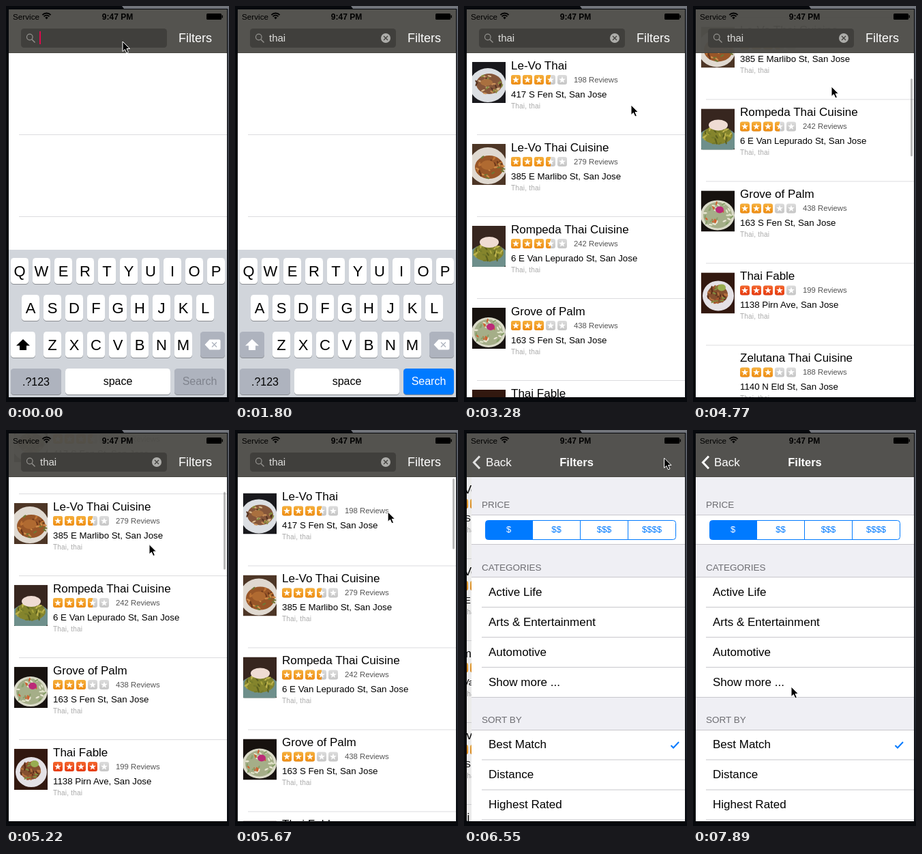
These frames come from a looping animation (327 px wide and 580 px high, 8000 ms). An HTML page:

```html
<!DOCTYPE html>
<html lang="en">
<head>
<meta charset="utf-8">
<title>Restaurant search</title>
<style>
html, body { margin: 0; width: 100%; height: 100%; overflow: hidden; background: #07090d; }
svg { display: block; width: 327px; height: 580px; font-family: "Liberation Sans", Arial, sans-serif; }
svg svg { width: 49px; height: 60px; }
</style>
</head>
<body>
<svg id="stage" viewBox="0 0 327 580"></svg>
<script>
const LOOP = 8000, STEP = 148.86;
const BLUE = '#007aff', LINE = '#c8c7cc';

const rect = (x, y, w, h, fill, r = 0, extra = '') =>
  `<rect x="${x}" y="${y}" width="${w}" height="${h}" rx="${r}" fill="${fill}" ${extra}/>`;
const text = (x, y, size, fill, str, extra = '') =>
  `<text x="${x}" y="${y}" font-size="${size}" fill="${fill}" ${extra}>${str}</text>`;
const path = (d, fill, extra = '') => `<path d="${d}" fill="${fill}" ${extra}/>`;
const ellipse = (cx, cy, rx, ry, fill, extra = '') =>
  `<ellipse cx="${cx}" cy="${cy}" rx="${rx}" ry="${ry}" fill="${fill}" ${extra}/>`;
const hline = (x, y, color = LINE) => rect(x, y, 324 - x, 1, color);
const MID = 'text-anchor="middle"';

function randomFrom(seed) {
  return () => (seed = seed * 16807 % 2147483647) / 2147483647;
}

// ---- search results ----
const places = [
  ['Le-Vo Thai', 3.5, 198, '417 S Fen St'],
  ['Le-Vo Thai Cuisine', 3.5, 279, '385 E Marlibo St'],
  ['Rompeda Thai Cuisine', 3.5, 242, '6 E Van Lepurado St'],
  ['Grove of Palm', 3, 438, '163 S Fen St'],
  ['Thai Fable', 4, 199, '1138 Pirn Ave'],
  ['Zelutana Thai Cuisine', 3, 188, '1140 N Eld St'],
];

// Each layer is an ellipse: cx, cy, rx, ry, colour.
const dishes = [
  { back: '#19191d', plate: [23, 34, 27, 25, '#dcdfe3'], food: [25, 32, 19, 15, '#85563a'],
    top: [21, 30, 9, 5, '#a9703f'], bits: ['#c98f58', '#553422', '#868c40', '#d9b88c'] },
  { back: '#4d3626', plate: [23, 32, 28, 27, '#e0d9d0'], food: [25, 34, 21, 17, '#985628'],
    top: [23, 31, 10, 7, '#b06a31'], bits: ['#d08c48', '#6a3519', '#bd7335', '#707735'] },
  { back: '#37261f', plate: [24, 47, 30, 20, '#6e8f8b'], food: [24, 39, 22, 13, '#84842c'],
    top: [25, 24, 14, 8, '#efdcd3'], bits: ['#a9a53c', '#5d611f', '#c0b450', '#757a2a'] },
  { back: '#17120f', plate: [24, 36, 25, 22, '#dadac8'], food: [24, 36, 21, 19, '#a5ae88'],
    top: [27, 28, 6, 5, '#bb2a78'], bits: ['#e0e3c8', '#cf6130', '#88a06a', '#eae7d4'] },
  { back: '#32180f', plate: [25, 34, 23, 22, '#e4e1e5'], food: [24, 32, 15, 13, '#85502f'],
    top: [30, 22, 6, 5, '#98ad50'], bits: ['#b5713f', '#5c2f1a', '#a4562f', '#7f8d40'] },
];

function photo({ back, plate, food, top, bits }, y, i) {
  const rnd = randomFrom(77 + i), [cx, cy, rx, ry] = food;
  let crumbs = '';
  for (let k = 0; k < 36; k++) {
    const a = rnd() * 2 * Math.PI, r = Math.sqrt(rnd());
    const x = (cx + rx * r * Math.cos(a)).toFixed(1), v = (cy + ry * r * Math.sin(a)).toFixed(1);
    crumbs += ellipse(x, v, 3, 1.2, bits[k % bits.length], `transform="rotate(${k * 47} ${x} ${v})"`);
  }
  return `<svg x="12" y="${y}" width="49" height="60" viewBox="0 0 49 60">` + rect(0, 0, 49, 60, back) +
    `<g filter="url(#soft)">${ellipse(...plate)}${ellipse(...food)}${crumbs}${ellipse(...top)}</g></svg>`;
}

function starPath(cx, cy) {
  const pts = Array.from({ length: 10 }, (_, k) => {
    const r = k % 2 ? 2.1 : 5.2, a = k * Math.PI / 5 - Math.PI / 2;
    return `${(cx + r * Math.cos(a)).toFixed(2)} ${(cy + r * Math.sin(a)).toFixed(2)}`;
  });
  return `M${pts.join('L')}Z`;
}

function rating(score, y) {
  const color = score >= 4 ? 'url(#red)' : 'url(#orange)';
  let out = '';
  for (let i = 0; i < 5; i++) {
    const x = 69 + 17 * i, fill = Math.min(1, Math.max(0, score - i));
    out += rect(x, y, 14, 14, 'url(#grey)', 3);
    if (fill === 1) out += rect(x, y, 14, 14, color, 3);
    else if (fill) out += path(`M${x + 7} ${y}h-4q-3 0-3 3v8q0 3 3 3h4z`, color);
    out += path(starPath(x + 7, y + 7.3), '#fff');
  }
  return out;
}

function place([name, score, reviews, street], i) {
  const y = 69 + 120 * i;
  return (dishes[i] ? photo(dishes[i], y + 13, i) : '') +
    text(69, y + 24, 17, '#000', name) +
    rating(score, y + 32) +
    text(161, y + 42.5, 11.3, '#555', `${reviews} Reviews`) +
    text(69, y + 64.5, 13.3, '#000', `${street}, San Jose`) +
    text(69, y + 81, 10, '#aaa', 'Thai, thai', 'letter-spacing=".2"');
}

const separators = Array.from({ length: 8 }, (_, i) => hline(19, 188 + 120 * i, '#dcdcdf')).join('');

// ---- keyboard ----
const key = (x, y, w, fill = '#fff', id = '') =>
  rect(x, y + 1, w, 38, '#8a8d92', 4.5) + rect(x, y, w, 38, fill, 4.5, id && `id="${id}"`);
const letters = (row, x, y) => [...row].map((c, i) =>
  key(x + 32 * i, y, 26) + text(x + 32 * i + 13, y + 27, 22, '#000', c, MID)).join('');

const keyboard = rect(4, 357, 320, 216, '#d1d5db') +
  letters('QWERTYUIOP', 7, 369) + letters('ASDFGHJKL', 23, 423) + letters('ZXCVBNM', 55, 477) +
  key(7, 477, 36, '#fff', 'shift') +
  path('M25 488l10 9.5h-5v6.5h-10v-6.5h-5z', '#000', 'id="shiftArrow" stroke-linejoin="round"') +
  key(285, 477, 36, '#aeb3be') +
  path('M291.5 496l7-7.5h14q2 0 2 2v11q0 2-2 2h-14z', '#fff') +
  path('M302 492.5l7 7m0-7l-7 7', 'none', 'stroke="#aeb3be" stroke-width="1.3"') +
  key(7, 531, 74, '#aeb3be') + text(44, 556, 16, '#000', '.?123', MID) +
  key(87, 531, 154) + text(164, 555, 16, '#000', 'space', MID) +
  key(247, 531, 74, '#aeb3be', 'go') + text(284, 555, 16, '#7f838d', 'Search', MID + ' id="goLabel"');

// ---- filters page ----
const options = (names, y) => names.map((name, i) =>
  text(29, y + 27.5 + 44 * i, 17, '#000', name) + (i ? hline(19, y + 44 * i) : '')).join('');
const heading = (y, str) => text(19, y, 13.5, '#6d6d72', str);
const block = (y, h) => rect(4, y, 320, h, '#fff') + hline(4, y) + hline(4, y + h - 1);

const filters = rect(4, 5, 320, 568, '#efeff4') +
  heading(114, 'PRICE') + block(124, 44) +
  path('M93.5 132.5h-65q-4 0-4 4v20q0 4 4 4h65z', BLUE) +
  rect(24.5, 132.5, 279, 28, 'none', 4, `stroke="${BLUE}"`) +
  [93.5, 163.5, 233.5].map(x => path(`M${x} 132.5v28`, 'none', `stroke="${BLUE}"`)).join('') +
  [1, 2, 3, 4].map(n => text(70 * n - 11.5, 150, 13, n === 1 ? '#fff' : BLUE, '$'.repeat(n), MID)).join('') +
  heading(205.5, 'CATEGORIES') + block(215, 177) +
  options(['Active Life', 'Arts &amp; Entertainment', 'Automotive', 'Show more ...'], 215) +
  heading(429, 'SORT BY') + block(439, 140) +
  options(['Best Match', 'Distance', 'Highest Rated', ''], 438.5) +
  path('M296.5 462l3.5 3.5 8-8.5', 'none', `stroke="${BLUE}" stroke-width="2"`);

// ---- bars ----
const searchBar =
  rect(22, 33, 214, 28, '#403f3c', 4.5) +
  '<circle cx="34.8" cy="45.5" r="4.3" fill="none" stroke="#93928e" stroke-width="1.2"/>' +
  path('M38 49l4.5 4.5', 'none', 'stroke="#93928e" stroke-width="1.4"') +
  text(50, 51.5, 15, '#dededc', '', 'id="query"') +
  rect(49, 37, 2, 19, '#dc0a4c', 0, 'id="caret"') +
  '<g id="clear"><circle cx="221" cy="47" r="7" fill="#adadaa"/>' +
  path('M218 44l6 6m0-6l-6 6', 'none', 'stroke="#403f3c" stroke-width="1.3"') + '</g>' +
  text(253, 53, 18, '#fff', 'Filters');

const arc = r => `M${59.5 - r * .72} ${19.5 - r * .75}a${r} ${r} 0 0 1 ${r * 1.44} 0`;
const statusBar =
  text(10, 19.5, 11.7, '#000', 'Service') +
  path(arc(8.5) + arc(5.5), 'none', 'stroke="#000" stroke-width="1.8"') +
  path('M59.5 19.5l-2.2-2.5q2.2-1.8 4.4 0z', '#000') +
  text(163.5, 19.5, 12, '#000', '9:47 PM', MID + ' font-weight="bold"') +
  rect(294, 11, 22, 9, '#000', 1.5) + rect(316.5, 13.5, 1.5, 4, '#000');

const gradient = (id, a, b) =>
  `<linearGradient id="${id}" x2="0" y2="1"><stop stop-color="${a}"/><stop offset="1" stop-color="${b}"/></linearGradient>`;

document.getElementById('stage').innerHTML = `<defs>
  ${gradient('orange', '#f6b03c', '#ee8c12')}${gradient('red', '#f4672e', '#e63a10')}
  ${gradient('grey', '#dcdcdc', '#c6c6c6')}${gradient('edge', '#5c6069', '#0b0e14')}
  <filter id="soft"><feGaussianBlur stdDeviation=".5"/></filter>
  <clipPath id="screen"><rect x="4" y="5" width="320" height="568"/></clipPath></defs>` +
  rect(0, 0, 327, 580, '#07090d') + rect(325, 0, 2, 573, 'url(#edge)') + path('M170 0H327V4H173z', '#72757c') +
  `<g clip-path="url(#screen)">` + rect(4, 5, 320, 568, '#fff') +
  `<g id="results"><g id="list">${separators}<g id="places">${places.map(place).join('')}</g></g>` +
  rect(319, 71, 3, 114, '#000', 1.5, 'id="thumb"') + `</g>` +
  rect(4, 5, 320, 568, '#000', 0, 'id="shade"') +
  `<g id="keyboard">${keyboard}</g><g id="filters">${filters}</g>` +
  rect(4, 5, 320, 64, '#4f4e4a', 0, 'opacity=".97"') + rect(4, 68, 320, 1, '#45443f') + statusBar +
  `<g id="searchBar">${searchBar}</g><g id="filterBar">` +
  path('M23 38.5l-8.5 9 8.5 9', 'none', 'id="chevron" stroke="#fff" stroke-width="3"') +
  `<g id="titles">` + text(31, 53, 17, '#fff', 'Back') +
  text(164, 53, 16.5, '#fff', 'Filters', MID + ' font-weight="bold"') + `</g></g></g>` +
  path('M0 0v14.5l3.4-3 2.5 5.5 2.5-1.1-2.4-5.4h4.5z', '#000',
    'id="pointer" stroke="#fff" stroke-width="1" stroke-linejoin="round"');

const ui = {};
document.querySelectorAll('[id]').forEach(el => ui[el.id] = el);
const set = (el, attrs) => Object.entries(attrs).forEach(([k, v]) => el.setAttribute(k, v));
const show = (el, on) => el.setAttribute('visibility', on ? 'visible' : 'hidden');
const shift = (el, x, y) => el.setAttribute('transform', `translate(${x} ${y})`);

// Linear interpolation over [time, value...] keys.
function track(keys, t) {
  const i = keys.findIndex(k => k[0] > t);
  if (i === 0) return keys[0].slice(1);
  if (i < 0) return keys[keys.length - 1].slice(1);
  const a = keys[i - 1], b = keys[i], p = (t - a[0]) / (b[0] - a[0]);
  return a.slice(1).map((v, k) => v + (b[k + 1] - v) * p);
}

const pointerKeys = [
  [0, 171, 52], [1900, 283, 572], [2090, 277, 552], [2520, 275, 546], [2950, 258, 270], [3275, 245, 145],
  [3720, 256, 95], [4020, 272, 50], [4320, 262, 115], [4465, 222, 215], [4620, 208, 165], [4763, 203, 118],
  [4910, 203, 90], [5060, 205, 105], [5360, 215, 230], [5656, 224, 120], [5950, 265, 62], [6100, 282, 46],
  [6400, 290, 41], [6550, 293.5, 41], [6698, 286, 70], [6995, 205, 120], [7145, 168, 172], [7440, 156, 270],
  [7740, 146, 360], [7889, 144, 376],
];
const scrollKeys = [
  [4320, 0], [4465, 22], [4615, 110], [4763, 171.5], [4912, 205], [5061, 185], [5210, 95],
  [5359, 10], [5508, -26], [5656, -10.5], [5805, -2.5], [5954, 0],
];

const typed = t => t < 140 ? '' : t < 290 ? 't' : t < 740 ? 'th' : t < 890 ? 'tha' : 'thai';
const caretX = { '': 49, t: 54, th: 62, tha: 70.5, thai: 73.5 };

function render(t) {
  const query = typed(t);
  ui.query.textContent = query;
  ui.caret.setAttribute('x', caretX[query]);
  show(ui.caret, t < 1150 || (t < 2200 && (t - 1150) % 600 > 300));
  show(ui.clear, query);
  set(ui.shift, { fill: query ? '#aeb3be' : '#fff' });
  set(ui.shiftArrow, { fill: query ? '#fff' : '#000' });
  set(ui.go, { fill: query ? BLUE : '#aeb3be' });
  set(ui.goLabel, { fill: query ? '#fff' : '#7f838d' });

  const drop = track([[2100, 0], [2240, 30], [2390, 160], [2540, 218]], t)[0];
  shift(ui.keyboard, 0, drop);
  show(ui.keyboard, drop < 218);
  show(ui.places, t > 2650);

  const scroll = track(scrollKeys, t)[0];
  shift(ui.list, 0, -scroll);
  set(ui.thumb, {
    y: 71 + Math.max(0, scroll) * .205,
    height: 114 + Math.min(0, scroll),
    opacity: track([[4400, 0], [4460, .28], [5960, .28], [6250, 0]], t)[0],
  });

  // The filters page slides in with an exponential tail.
  const off = t < 6245 ? 320 : Math.min(320, 320 * Math.exp(-(t - 6256) * .013));
  const left = off < .6 ? 0 : off, p = 1 - left / 320;
  shift(ui.filters, left, 0);
  shift(ui.results, -96 * p, 0);
  ui.shade.setAttribute('opacity', .08 * p);
  ui.searchBar.setAttribute('opacity', Math.max(0, 1 - p * 1.2));
  ui.filterBar.setAttribute('opacity', p);
  ui.chevron.setAttribute('opacity', Math.max(0, 1 - left / 45));
  shift(ui.titles, left * .15, 0);

  shift(ui.pointer, ...track(pointerKeys, t));
  show(ui.pointer, t < 140 || t > 1900);
}

const start = performance.now();
function tick() {
  const t = (performance.now() - start) % LOOP;
  render(Math.floor(t / STEP) * STEP);
  requestAnimationFrame(tick);
}
tick();
</script>
</body>
</html>
```
